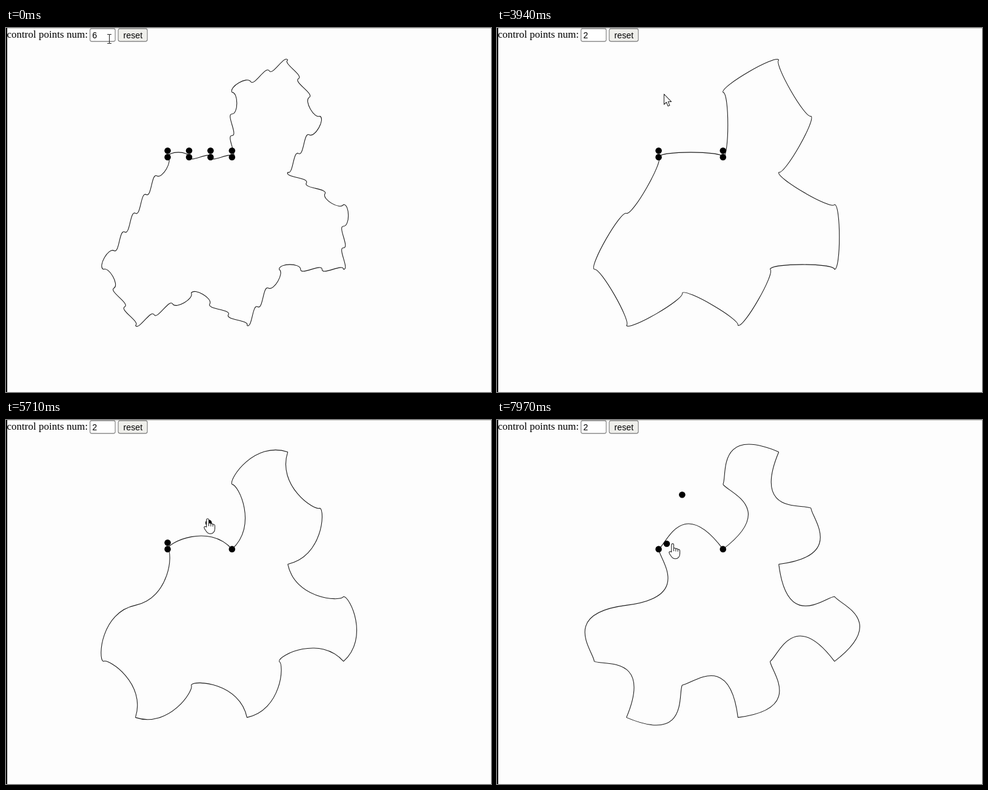
Recreate the animation shown at these times as an HTML page. Size 800x600 px, loop 8000 ms.

```html
<!DOCTYPE html>
<html lang="en">
<head>
<meta charset="utf-8">
<title>Curved tile editor</title>
<style>
html, body { margin: 0; width: 100%; height: 100%; overflow: hidden; background: #fdfdfd; }
svg { display: block; width: 100vw; height: 100vh; }
.label { font: 17.07px "Liberation Serif", serif; }
.form { font: 14.2px "Liberation Sans", sans-serif; }
.cursor { fill: #fff; stroke: #222; stroke-width: 1.05; stroke-linejoin: round; stroke-linecap: round; }
.cursor .line { fill: none; }
</style>
</head>
<body>
<svg viewBox="0 0 800 600">
  <rect width="800" height="600" fill="#fdfdfd"/>
  <rect width="800" height="1" fill="#d0d0cc"/>
  <rect width="2" height="600" fill="#000"/>
  <text class="label" x="1.4" y="16.3">control points num:</text>
  <rect id="box" x="138.6" y="1.1" width="41.5" height="21" rx="2.5" fill="#fff"/>
  <text id="value" class="form" x="142.3" y="16.6"></text>
  <path id="caret" d="M0 4.5V19" stroke="#000"/>
  <rect x="185.1" y="1.1" width="48" height="21" rx="3" fill="#efefeb" stroke="#767676" stroke-width="1.07"/>
  <text class="form" x="193.6" y="16.6">reset</text>
  <path id="tile" fill="none" stroke="#1a1a1a" stroke-width="1.07"/>
  <g id="dots"></g>
  <g id="ibeam" class="cursor">
    <path class="line" d="M-3 -7.5H-1Q0 -7.5 0 -6.5Q0 -7.5 1 -7.5H3M0 -6.5V6.5M-3 7.5H-1Q0 7.5 0 6.5Q0 7.5 1 7.5H3"/>
  </g>
  <g id="arrow" class="cursor"><path d="M0 0V17L3.9 13.4L6.6 19.8L9.4 18.6L6.7 12.4H12Z"/></g>
  <g id="hand" class="cursor">
    <g transform="translate(1.5 1)">
      <path d="M-1.8 13.6V1.6A1.8 1.8 0 0 1 1.9 1.6V7.6Q3.7 5.9 5.3 8.2Q7.3 6.9 8.7 9.2Q11.8 8.4 12 11.6V16C12 21 9 24.6 4.4 24.6C0 24.6 -1.6 21.6 -5.1 16.2C-7 13 -3.7 11.5 -1.8 13.6Z"/>
      <path class="line" d="M1.9 7.6V11.6M5.3 8.2V12M8.7 9.2V12.4"/>
    </g>
  </g>
</svg>
<script>
const LOOP = 8000, LAG = 60;
const ORIGIN = [266.6, 212.9], SCALE = [106.2, 106.8];
const FOCUS = 600, CLEAR = 1230, RETYPE = 1500, APPLY = 2300;
// Edge directions in steps of 30 degrees
const HEADINGS = [0, 3, 1, -2, -4, -1, -3, 6, -4, 5, 7, 4, 2, 2];
// Pointer stops: arrive, leave, x, y
const STOPS = [
  [0, 1800, 170.5, 18], [2150, 2420, 210, 14], [3940, 3940, 275.5, 109],
  [4800, 4950, 379, 202.5], [5070, 5370, 371, 195.5], [5910, 5910, 313.3, 147],
  [6310, 6450, 311.6, 123.5], [6570, 6570, 293.5, 153], [7370, 7510, 272, 198],
  [7540, 7680, 272, 201], [LOOP, LOOP, 288.5, 203.2]
];
const DRAG_END = [4950, 6310], DRAG_START = [7680, LOOP];

const el = id => document.getElementById(id);
const clamp = (v, lo, hi) => Math.min(Math.max(v, lo), hi);
const smooth = u => u * u * (3 - 2 * u);
const set = (node, attrs) => {
  for (const k in attrs) node.setAttribute(k, attrs[k]);
};
const show = on => on ? "visible" : "hidden";
const toStage = p => p.map((v, k) => ORIGIN[k] + v * SCALE[k]);
const toUnit = p => p.map((v, k) => (v - ORIGIN[k]) / SCALE[k]);

function pointer(t) {
  const i = STOPS.findIndex(s => s[0] > t);
  const [, leave, x, y] = STOPS[i - 1], [arrive, , nx, ny] = STOPS[i];
  const u = t < leave ? 0 : smooth((t - leave) / (arrive - leave));
  return [x + (nx - x) * u, y + (ny - y) * u];
}

// A dragged point trails the pointer slightly.
function dragged(home, [from, to], t) {
  const start = pointer(from), now = pointer(clamp(t - LAG, from, to));
  return toUnit(toStage(home).map((v, k) => v + now[k] - start[k]));
}

function controls(t) {
  if (t >= APPLY) {
    return [[0, 0], dragged([0, -0.1], DRAG_START, t), dragged([1, -0.1], DRAG_END, t), [1, 0]];
  }
  const list = [[0, 0], [0, -0.1]];
  for (let k = 1; k <= 3; k++) list.push([k / 3, -0.1], [k / 3, 0]);
  return list;
}

const angle = h => -h * Math.PI / 6;
const corners = [[0, 0]];
HEADINGS.forEach((h, i) => {
  const [x, y] = corners[i];
  corners.push([x + Math.cos(angle(h)), y + Math.sin(angle(h))]);
});

// Every edge is a turned copy of the first, starting from its even corner.
function edge(i, points) {
  const odd = i % 2, [ox, oy] = corners[i + odd];
  const a = angle(HEADINGS[i] + 6 * odd), c = Math.cos(a), s = Math.sin(a);
  const p = points.map(([x, y]) =>
    toStage([ox + x * c - y * s, oy + x * s + y * c]).map(v => v.toFixed(2)).join(" "));
  let d = `M${p[0]}C${p[1]} ${p[2]} ${p[3]}`;
  for (let k = 4; k < p.length; k += 2) d += `S${p[k]} ${p[k + 1]}`;
  return d;
}

const dots = Array.from({ length: 8 }, () => {
  const dot = document.createElementNS("http://www.w3.org/2000/svg", "circle");
  dot.setAttribute("r", 5.3);
  return el("dots").appendChild(dot);
});

function drawForm(t) {
  const focus = t >= FOCUS && t < APPLY, empty = t >= CLEAR && t < RETYPE;
  set(el("box"), { stroke: focus ? "#101010" : "#767676", "stroke-width": focus ? 2.1 : 1.07 });
  el("value").textContent = empty ? "" : t < CLEAR ? "6" : "2";
  set(el("caret"), { visibility: show(focus), transform: `translate(${empty ? 143 : 151})` });
}

function drawPointer(t) {
  const holding = (t >= 4800 && t < 6470) || t >= 7290;
  const kind = t < 1880 ? "ibeam" : holding ? "hand" : "arrow";
  for (const id of ["ibeam", "arrow", "hand"]) {
    set(el(id), { visibility: show(id === kind), transform: `translate(${pointer(t)})` });
  }
}

function draw(t) {
  const points = controls(t);
  set(el("tile"), { d: HEADINGS.map((_, i) => edge(i, points)).join("") });
  dots.forEach((dot, i) => {
    const [cx, cy] = toStage(points[i] || [0, 0]);
    set(dot, { cx, cy, visibility: show(points[i]) });
  });
  drawForm(t);
  drawPointer(t);
}

const begin = performance.now();
function tick() {
  draw(Math.max(0, performance.now() - begin) % LOOP);
  requestAnimationFrame(tick);
}
tick();
</script>
</body>
</html>
```
